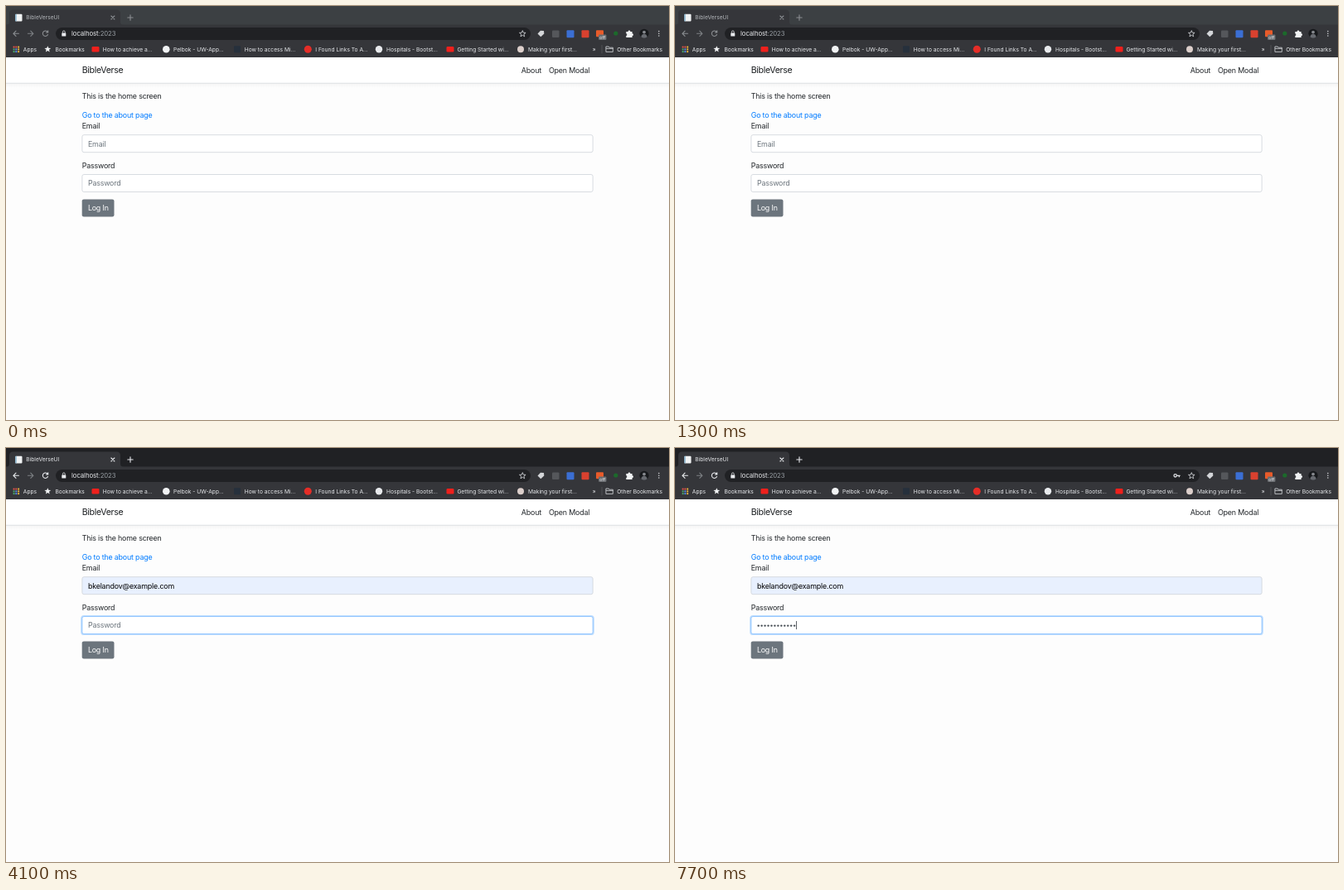
Write an HTML page that moves like this. It is 800 by 500 pixels and loops after 8000 ms.

```html
<!DOCTYPE html>
<html lang="en">
<head>
<meta charset="utf-8">
<title>Login form</title>
<style>
html, body { margin: 0; width: 100%; height: 100%; overflow: hidden; background: #000; }
svg { display: block; width: 100vw; height: 100vh; }
text { font-family: Inter, Roboto, sans-serif; white-space: pre; }
.ui { font-size: 6.67px; fill: #e8eaed; }
.url { font-size: 7.78px; letter-spacing: -.01em; fill: #e8eaed; }
.page { font-size: 8.89px; letter-spacing: -.02em; fill: #212529; }
.brand { font-size: 10.6px; letter-spacing: -.03em; fill: #1b1e21; }
.line { fill: none; stroke-width: 1.1; stroke-linecap: round; stroke-linejoin: round; }
</style>
</head>
<body>
<svg id="stage" viewBox="0 0 800 500"></svg>
<script>
const LOOP = 8000;
const EMAIL = 'bkelandov@example.com';
const DOT_STEP = 3.95, TEXT_X = 98.9;

// Step tracks: [time, value], each value holds until the next
const shift = [[0, 0], [500, -3.5], [700, -5], [900, -2.5], [1100, -1], [1300, 0]];
const focus = [[0, ''], [2100, 'email'], [3700, 'password']];
const emailLength = [[0, 0], [2500, 1], [2700, 2], [2900, 3], [3100, EMAIL.length]];
const dotCount = [[0, 0], [4300, 1], [4500, 2], [4700, 3], [5100, 5], [5300, 6],
  [5500, 7], [5700, 8], [5900, 9], [6100, 10], [6300, 11], [6700, 12]];
const caretOn = [[0, 1], [4100, 0], [4300, 1], [7300, 0], [7700, 1]];

const at = (track, t) => track.reduce((v, [time, next]) => time <= t ? next : v, track[0][1]);

const text = (x, y, cls, s, extra = '') => `<text x="${x}" y="${y}" class="${cls}" ${extra}>${s}</text>`;
const rect = (x, y, w, h, fill, r = 0, extra = '') =>
  `<rect x="${x}" y="${y}" width="${w}" height="${h}" rx="${r}" fill="${fill}" ${extra}/>`;
const disc = (x, y, r, fill) => `<circle cx="${x}" cy="${y}" r="${r}" fill="${fill}"/>`;
const line = (d, stroke, extra = '') => `<path class="line" d="${d}" stroke="${stroke}" ${extra}/>`;

function star(cx, cy, r, paint) {
  const points = Array.from({ length: 10 }, (_, i) => {
    const a = (i / 5 - .5) * Math.PI, q = i % 2 ? r * .43 : r;
    return `${(cx + q * Math.cos(a)).toFixed(2)},${(cy + q * Math.sin(a)).toFixed(2)}`;
  });
  return `<polygon points="${points.join(' ')}" ${paint}/>`;
}

function tabStrip() {
  return rect(0, 0, 800, 24, '#202124', 0, 'id="strip"') +
    '<path d="M0 23Q4 23 4 19V9Q4 4.5 8.500 4.500H133.500Q138 4.500 138 9V19Q138 23 142 23Z" fill="#35363a"/>' +
    rect(11.5, 9.8, 8, 8.6, '#f1f3f4', 1) + rect(11, 9.8, 1.8, 8.6, '#8fb5cc', .6) +
    text(24.3, 16.4, 'ui', 'BibleVerseUI', 'id="title"') +
    line('M126.900 12l4 4m0-4l-4 4', '#dadce0', 'data-live') +
    line('M146.800 14h6.400M150 10.800v6.400', '#dadce0', 'data-live');
}

function toolbar() {
  return rect(0, 22.5, 800, 39.5, '#35363a') + rect(60, 26, 573, 15, '#202124', 7.5) +
    line('M15.400 33.300H9M12 30.200L8.900 33.300L12 36.400', '#e8eaed', 'data-live') +
    line('M26.400 33.300h6.400M29.800 30.200L32.900 33.300L29.800 36.400', '#7d8084') +
    line('M50.300 31.600A3.200 3.200 0 1 0 50.500 34.500M50.700 29.800v2.200h-2.200', '#e8eaed', 'data-live') +
    rect(67.3, 32.5, 5, 4, '#e8eaed', .5) +
    line('M68.400 32.500v-1.200a1.400 1.400 0 0 1 2.800 0v1.200', '#e8eaed', 'style="stroke-width:.8"') +
    text(79, 36.1, 'url', 'localhost<tspan fill="#9aa0a6">:2023</tspan>') +
    `<g id="key" fill="none" stroke="#dadce0" stroke-width="1.300">
      <circle cx="603.700" cy="33.300" r="1.700"/><path d="M605.400 33.300h4.200M608.300 33.300v1.900"/></g>` +
    star(623.3, 33.6, 4, 'fill="none" stroke="#dadce0" stroke-width=".800"') + extensions();
}

function extensions() {
  return '<path d="M641.500 33.500l3.500-3.700 4 .300.300 3.400-4 3.800z" fill="#d4d6d9"/>' +
    rect(659, 29.5, 8.5, 8.5, '#55575b', 1) +
    rect(676.5, 29.2, 9, 9, '#3b6fd4', 1) +
    rect(694.5, 29.2, 9, 9, '#d9412f', 1) +
    rect(712, 29.2, 9, 8, '#e85b2a', 1) +
    rect(715, 34.6, 9.5, 6.4, '#6b6e72', 1.2) +
    text(719.8, 39.7, 'ui', 'off', 'text-anchor="middle" style="font-size:5.300px"') +
    disc(735.8, 33, 2.6, '#1c6a2b') +
    '<path d="M748.300 31h2.300a1.400 1.400 0 1 1 2.800 0h2.200v2.300a1.400 1.400 0 1 1 0 2.800v1.900h-7.300v-2a1.400 1.400 0 0 0 0-2.700z" fill="#f1f3f4"/>' +
    disc(770, 33.3, 5.6, '#17191c') + disc(770, 31.6, 1.9, '#85888d') +
    '<path d="M766.300 37.400q.600-3.600 3.700-3.600t3.700 3.600q-3.700 2.600-7.400 0z" fill="#676a70"/>' +
    [30.6, 33.3, 36].map(y => disc(787.8, y, .75, '#dadce0')).join('');
}

function bookmarks() {
  const colors = ['#e8554a', '#e8554a', '#f0b93a', '#4caf6a', '#5a8df0', '#f0b93a', '#4caf6a', '#5a8df0', '#f0b93a'];
  const grid = colors.map((c, i) => rect(8.6 + i % 3 * 2.8, 48.6 + Math.floor(i / 3) * 2.8, 1.9, 1.9, c)).join('');
  const labels = [[20.8, 'Apps'], [59.5, 'Bookmarks'], [116.7, 'How to achieve a...'],
    [202, 'Pelbok - UW-App...'], [287.7, 'How to access Mi...'], [373.3, 'I Found Links To A...'],
    [459, 'Hospitals - Bootst...'], [544.4, 'Getting Started wi...'], [630, 'Making your first...'],
    [707.7, '»'], [737.2, 'Other Bookmarks']];
  return grid + star(50.3, 52.3, 4.1, 'fill="#f1f3f4"') +
    [103.5, 531.5].map(x => rect(x, 49, 9, 6.6, '#f0201c', 1.4)).join('') +
    disc(193.3, 52.2, 4.3, '#f1f3f4') + rect(275, 48.3, 8, 8, '#26303c', 1) +
    disc(364.3, 52.2, 4.5, '#e52d27') + disc(450, 52.2, 4.2, '#e8eaed') +
    disc(621, 52.2, 4, '#dccfcb') +
    line('M719 47.500v9.500', '#5c5e62', 'style="stroke-width:.700"') +
    line('M724.300 49h2.800l1 1.200h4.200v5.200h-8zM724.300 51.400h8', '#c4c7cb', 'style="stroke-width:.900"') +
    labels.map(([x, s]) => text(x, 54.5, 'ui', s)).join('');
}

const field = (id, y) =>
  rect(91.1, y - .7, 617.8, 22.4, 'none', 3, `id="${id}Glow" stroke="#007bff" stroke-opacity=".25" stroke-width="1.800"`) +
  rect(91.9, y, 616.2, 21, '#fff', 2.2, `id="${id}" stroke-width=".800"`);

function page() {
  return rect(0, 62, 800, 438, '#fdfdfd') + rect(0, 62, 800, 31, '#fff') +
    rect(0, 93, 800, 6, 'url(#shade)') + rect(0, 92.8, 800, .8, '#d8dbde') +
    text(91.7, 81.1, 'brand', 'BibleVerse') +
    text(621.8, 80.7, 'page', 'About') + text(655, 80.7, 'page', 'Open Modal') +
    text(91.7, 112.2, 'page', 'This is the home screen') +
    text(91.7, 134.6, 'page', 'Go to the about page', 'style="fill:#007bff"') +
    text(91.7, 147.9, 'page', 'Email') + field('email', 155.7) +
    text(TEXT_X, 169.6, 'page', '', 'id="emailText"') +
    text(91.7, 195.6, 'page', 'Password') + field('password', 203.5) +
    text(TEXT_X, 217.3, 'page', 'Password', 'id="hint" style="fill:#6c757d"') +
    '<g id="dots">' + Array.from({ length: 12 }, (_, i) =>
      disc(TEXT_X + (i + .45) * DOT_STEP, 214.6, 1.2, '#495057')).join('') + '</g>' +
    rect(0, 0, .8, 10, '#343a40', 0, 'id="caret"') +
    rect(91.7, 233.4, 38.8, 21, '#6c757d', 2.2) +
    text(98.9, 247.2, 'page', 'Log In', 'style="fill:#fff"');
}

const stage = document.getElementById('stage');
stage.innerHTML = `<defs><linearGradient id="shade" x2="0" y2="1">
  <stop stop-color="#000" stop-opacity=".035"/><stop offset="1" stop-color="#000" stop-opacity="0"/>
  </linearGradient></defs><rect width="800" height="500"/>
  <g id="win">${page()}${tabStrip()}${toolbar()}${bookmarks()}</g>`;

const el = id => document.getElementById(id);
const show = (node, on) => node.setAttribute('visibility', on ? 'visible' : 'hidden');
const dots = [...el('dots').children];
const live = [...stage.querySelectorAll('[data-live]')];

function paintField(id, focused) {
  show(el(id + 'Glow'), focused);
  el(id).setAttribute('stroke', focused ? '#80bdff' : '#ced4da');
}

function render(t) {
  const focused = at(focus, t), typed = at(emailLength, t), count = at(dotCount, t);
  const active = focused !== '';

  el('win').setAttribute('transform', `translate(${at(shift, t)} 0)`);
  el('strip').setAttribute('fill', active ? '#202124' : '#3c4043');
  el('title').style.fill = active ? '#e8eaed' : '#b4b7bb';
  live.forEach(n => n.setAttribute('stroke', active ? '#e8eaed' : '#8b8e92'));
  show(el('key'), count > 0);

  paintField('email', focused === 'email');
  paintField('password', focused === 'password');
  el('email').setAttribute('fill', typed === EMAIL.length ? '#e8f0fe' : '#fff');
  const label = el('emailText');
  label.textContent = typed ? EMAIL.slice(0, typed) : 'Email';
  label.style.fill = typed ? '#000' : '#6c757d';

  show(el('hint'), count === 0);
  dots.forEach((d, i) => show(d, i < count));

  const inEmail = focused === 'email';
  const width = inEmail ? (typed ? label.getComputedTextLength() : 0) : count * DOT_STEP;
  el('caret').setAttribute('x', TEXT_X + width - .2);
  el('caret').setAttribute('y', inEmail ? 161.4 : 209);
  show(el('caret'), active && at(caretOn, t));
}

function tick() {
  render(performance.now() % LOOP);
  requestAnimationFrame(tick);
}
tick();
</script>
</body>
</html>
```
